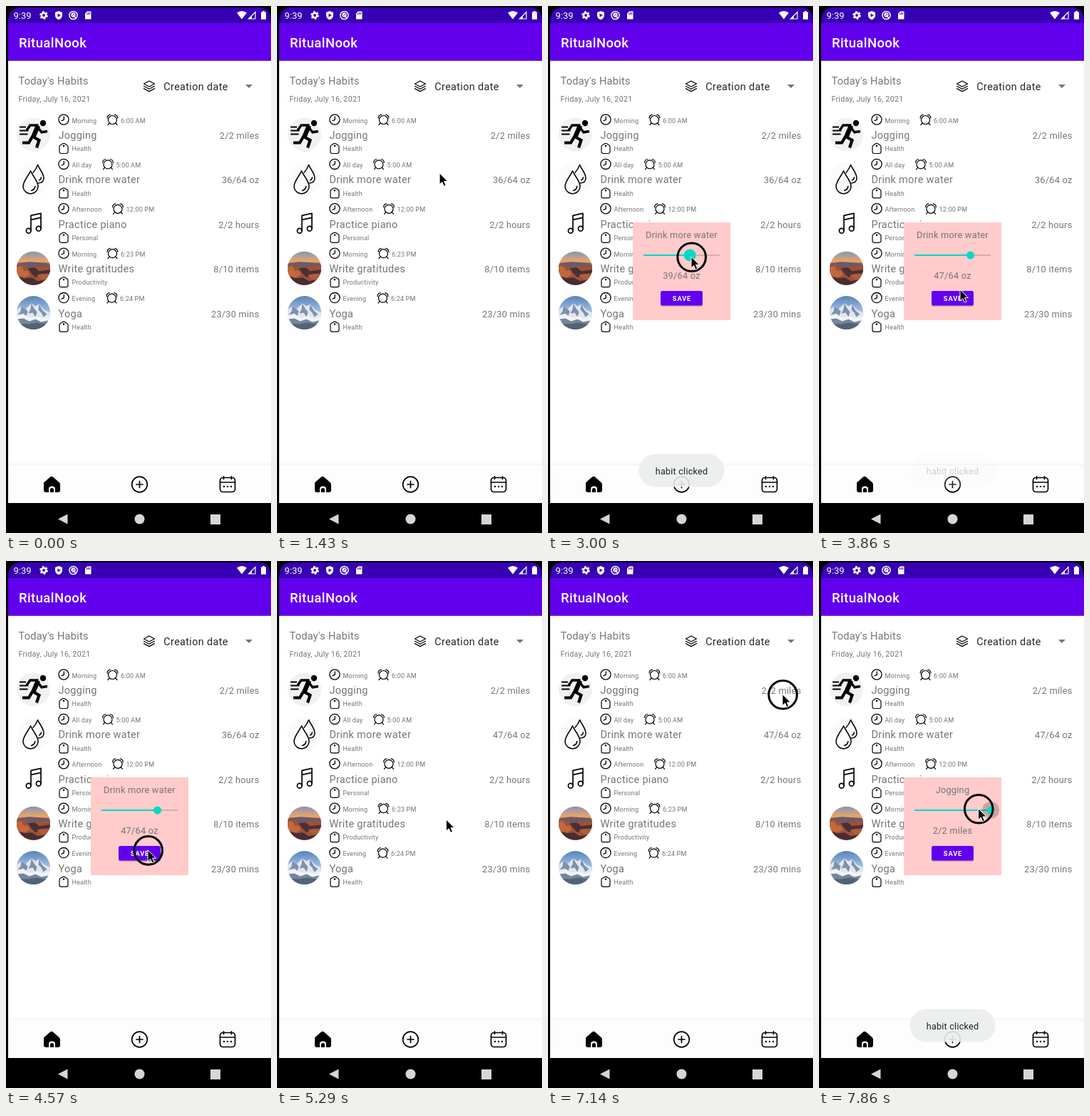
Animation of 372 by 738 pixels, one loop 8 s. Source, as an HTML page:

```html
<!DOCTYPE html>
<html lang="en">
<head>
<meta charset="utf-8">
<title>Habit list</title>
<style>
  html, body { margin: 0; width: 100%; height: 100%; overflow: hidden; background: #000; }
  svg { display: block; width: 372px; height: 738px; }
  text { font-family: Roboto, sans-serif; letter-spacing: .0178em; fill: #757575; }
  .big { font-size: 14.55px; }
  .mid { font-size: 12.8px; }
  .date { font-size: 10.8px; }
  .small { font-size: 9.1px; }
  .end { text-anchor: end; }
  .center { text-anchor: middle; }
  .line { fill: none; stroke: #000; stroke-linecap: round; stroke-linejoin: round; }
</style>
</head>
<body>
<svg viewBox="0 0 372 738">
  <defs>
    <clipPath id="disc"><circle r="23.5"/></clipPath>
    <linearGradient id="dusk" x2="0" y2="1">
      <stop stop-color="#8592ad"/><stop offset=".15" stop-color="#b59d98"/>
      <stop offset=".3" stop-color="#eaa562"/><stop offset=".38" stop-color="#c98257"/>
    </linearGradient>
    <linearGradient id="sky" x2="0" y2="1">
      <stop stop-color="#5583bd"/><stop offset=".5" stop-color="#a9c4e2"/>
    </linearGradient>
    <pattern id="checks" width="4" height="4" patternUnits="userSpaceOnUse">
      <path fill="#f6f6f6" d="M0 0h2v2H0zM2 2h2v2H2z"/>
    </pattern>
    <linearGradient id="edge" x2="0" y2="1">
      <stop stop-color="#fff"/><stop offset="1" stop-color="#f3f3f3"/>
    </linearGradient>

    <g id="clock" class="line" stroke-width="1.3">
      <circle r="7.1"/><path d="M.3-4V.3L-3 1.6"/>
    </g>
    <g id="alarm" class="line" stroke-width="1.2">
      <circle r="6"/><path d="M-7.3-2.5Q-7.5-6.5-3.2-7.4M3.2-7.4Q7.5-6.5 7.3-2.5M-4.3 4.3-6.5 7M4.3 4.3 6.5 7"/>
    </g>
    <g id="tag" class="line" stroke-width="1.2">
      <path d="M-6-2.5Q-6-4-4.5-4.8L-1.5-6.7Q0-7.4 1.5-6.7L4.5-4.8Q6-4 6-2.5V4.5Q6 7 3.5 7H-3.5Q-6 7-6 4.5Z"/>
      <circle cy="-3.6" r=".7"/>
    </g>

    <g id="runner">
      <circle r="23.5" fill="#f1f1f1"/>
      <circle cx="13.5" cy="-16" r="4.2"/>
      <g class="line" stroke-width="3.4" style="stroke-linecap:butt;stroke-linejoin:miter">
        <path d="M6.500-12.500-.5 4" stroke-width="6.500"/>
        <path d="M7-13H-4.500L-9.500-6M6.500-9.500 11.500-3.200 19.500-4.500"/>
        <path d="M-2.500 2 8 8 4.500 18.500M-1.500 3-6.500 11.500H-15.500" stroke-width="4.200"/>
        <path d="M-19.500-10.500H-10.500M-19.500-5.500H-7M-19.500-.5H-8" stroke-width="1.800"/>
      </g>
    </g>
    <g id="drops">
      <circle r="23.5" fill="url(#checks)"/>
      <g class="line" stroke-width="1.5">
        <path d="M-4-11.500C-7-4.500-14.500 3-14.500 10A10.500 10.500 0 0 0 6.500 10C6.500 3-1-4.500-4-11.500Z"/>
        <path d="M-.5-9Q4-14.500 6-20C9-13 14.500-8 14.500-1.500Q14.500 5 7 5.500M-3 16Q1.800 15 2.300 10M8 1.500Q10.500 1 11-2.500"/>
      </g>
    </g>
    <g id="notes" class="line" stroke-width="1.7">
      <path d="M-3.500 9.500V-11.500L10.500-14.500V6.500M-3.500-5.500 10.500-8.500"/>
      <ellipse cx="-6.800" cy="10" rx="3.300" ry="3.400"/><ellipse cx="7.200" cy="7" rx="3.300" ry="3.400"/>
    </g>
    <g id="canyon" clip-path="url(#disc)">
      <path fill="url(#dusk)" d="M-24-24h48v48h-48z"/>
      <path fill="#6a5a68" d="M-24-7-6-9 24-7V8H-24Z"/>
      <path fill="#9c5138" d="M-24-4-14-5-8 0 4-2 24-4V24H-24Z"/>
      <path fill="#c3683c" d="M-24-2-17-3-13 4-8 3-5 9-12 13-24 10Z"/>
      <path fill="#4a2f33" d="M-8 0 2-1 8 4 24 2V7L11 8 3 13-3 7Z"/>
      <path fill="#b35c39" d="M5 9 14 8 24 9V15L12 16Z"/>
      <path fill="#472d30" d="M-24 11-12 14-2 13 6 18 24 15V24H-24Z"/>
    </g>
    <g id="summit" clip-path="url(#disc)">
      <path fill="url(#sky)" d="M-24-24h48v48h-48z"/>
      <path fill="#dfe7f0" d="M-24-4-17-9-11-5-3-13 3-9 8-12 15-4 24 0V24H-24Z"/>
      <path fill="#7f90a8" d="M-17-9-18-2-22 3-14 1-10 5-8-2-11-5ZM-3-13-4-5-7 1-1 0 3 6 5-1 1-6ZM8-12 7-4 11 0 14 6 19 2 13-3Z"/>
      <path fill="#f1f4f8" d="M-24 4-12 3-5 7 5 5 13 8 24 5V12L6 14-24 11Z"/>
      <path fill="#75869c" d="M-24 9-14 8-6 12 3 9 11 13 24 10V24H-24Z"/>
      <path fill="#536274" d="M-24 15-8 16 4 14 24 17V24H-24Z"/>
    </g>
  </defs>

  <path fill="#fff" d="M3 76.500H372V696H3Z"/>
  <path fill="#3700b3" d="M3 24V22Q3 2 22 2H354Q372 2 372 22V24Z"/>
  <path fill="#6200ee" d="M3 24H372V76.500H3Z"/>

  <!-- status bar -->
  <text x="10.5" y="18" font-size="13" style="fill:#fff;letter-spacing:0">9:39</text>
  <g fill="#fff">
    <circle cx="53" cy="13" r="3.2" fill="none" stroke="#fff" stroke-width="2.6"/>
    <circle cx="53" cy="13" r="5" fill="none" stroke="#fff" stroke-width="1.8" stroke-dasharray="2.6 2.636"/>
    <path d="M74 7 79 9V13Q79 17.5 74 19.3 69 17.5 69 13V9Z"/>
    <path d="M72.5 10.5V15.5L76.8 13Z" fill="#3700b3"/>
    <g fill="none" stroke="#fff" stroke-width="1.5">
      <circle cx="94.5" cy="13" r="5.6"/><circle cx="94.5" cy="12.5" r="2.4"/><path d="M93 11 98 17"/>
    </g>
    <path d="M114 7.5H119.5V18.5H111V10.5Z"/>
    <path d="M113.5 10V12M115.5 9V12M117.5 9V12" stroke="#3700b3"/>
    <path d="M324 9.5Q331 4.500 338 9.500L331 18.500Z"/>
    <path d="M340.500 18 350 8.500V18Z" fill="none" stroke="#fff" stroke-width="1.2"/>
    <path d="M345 13.500V18H340.500Z"/>
    <path d="M358 8.500H360V7H363V8.500H365V18.800H358Z"/>
  </g>
  <text x="18" y="57.5" font-size="18.5" font-weight="500" style="fill:#fff;letter-spacing:.4px">RitualNook</text>

  <!-- list heading -->
  <text class="big" x="17.5" y="110">Today's Habits</text>
  <text class="date" x="17.5" y="133.5">Friday, July 16, 2021</text>
  <path class="line" stroke-width="1.2" d="M201 105 208.500 109 201 113 193.500 109ZM193.500 112.300 201 116.300 208.500 112.300M193.500 115.600 201 119.600 208.500 115.600"/>
  <text x="221.300" y="117.5" font-size="14.4" style="fill:#262626;letter-spacing:.025em">Creation date</text>
  <path fill="#757575" d="M336 110H346L341 115Z"/>

  <g id="rows"></g>

  <!-- bottom tabs and system keys -->
  <path fill="url(#edge)" d="M3 639H372V643H3Z"/>
  <path fill="#fdfdfd" d="M3 643H372V691H3Z"/>
  <path fill="#fff" d="M3 691H372V696H3Z"/>
  <path d="M53 667.500 62 659.500Q64 658 66 659.500L75 667.500Q76 668.500 76 670V678Q76 681 73 681H69V676Q69 672.500 64.500 672.500T60 676V681H56Q53 681 53 678Z"/>
  <path d="M62 681V677Q62 675 64.500 675T67 677V681Z"/>
  <g class="line" stroke-width="1.7">
    <circle cx="187.5" cy="670" r="10.8"/><path d="M187.500 665.500V674.500M183 670H192"/>
    <rect x="300.5" y="660.5" width="21" height="20" rx="4"/>
    <path d="M300.500 667H321.500M305.500 658.800V662.500M316.500 658.800V662.500"/>
    <path d="M306 673h.1M311 673h.1M316 673h.1" stroke-width="2.3"/>
  </g>
  <g fill="#d6d6d6">
    <path d="M73 718.500 86.500 711.500V725.500Z"/>
    <circle cx="187.5" cy="718.5" r="7"/>
    <path d="M287 712H301V726H287Z"/>
  </g>

  <g id="dialog">
    <rect x="119" y="303" width="137" height="137" fill="#ffcbcb"/>
    <text id="title" class="mid center" x="187.5" y="325"></text>
    <path stroke="#c8a3a3" stroke-width="1.5" d="M134 349H241"/>
    <path id="filled" stroke="#03dac5" stroke-width="2"/>
    <circle id="halo" cy="349" r="12" fill="#000" opacity=".2"/>
    <circle id="thumb" cy="349" fill="#03dac5"/>
    <text id="amount" class="mid center" x="187.5" y="381.5"></text>
    <rect x="158" y="400" width="59" height="21" rx="2.5" fill="#000" opacity=".2"/>
    <rect x="158" y="399" width="59" height="20.5" rx="2.5" fill="#6200ee"/>
    <text class="center" x="188" y="413" font-size="9.3" font-weight="700" style="fill:#fff;letter-spacing:.09em">SAVE</text>
  </g>

  <g id="toast">
    <rect x="127.5" y="627.5" width="120" height="46" rx="23" fill="#ebeeee" opacity=".9"/>
    <text class="center" x="187.5" y="655.5" font-size="12.6" style="fill:#222">habit clicked</text>
  </g>

  <g id="pointer">
    <circle id="ring" cx=".7" cy=".7" r="19.8" fill="none" stroke="#000" stroke-width="3"/>
    <path d="M0 0V16L3.700 12.600 6.200 18.300 9 17.100 6.500 11.500H11.500Z" stroke="#fff" stroke-width="1"/>
  </g>
</svg>
<script>
const $ = id => document.getElementById(id);

const habits = [
  ['runner', 'Morning', '6:00 AM', 161, 'Jogging', 'Health', '2/2 miles'],
  ['drops', 'All day', '5:00 AM', 154.5, 'Drink more water', 'Health', '36/64 oz'],
  ['notes', 'Afternoon', '12:00 PM', 168.5, 'Practice piano', 'Personal', '2/2 hours'],
  ['canyon', 'Morning', '6:23 PM', 161, 'Write gratitudes', 'Productivity', '8/10 items'],
  ['summit', 'Evening', '6:24 PM', 160, 'Yoga', 'Health', '23/30 mins']
];
$('rows').innerHTML = habits.map(([icon, part, time, x, name, label, done], i) => `
  <g transform="translate(0 ${62.4 * i})">
    <use href="#${icon}" x="38.5" y="180"/>
    <use href="#clock" x="81" y="159"/>
    <text class="small" x="92.5" y="163.7">${part}</text>
    <use href="#alarm" x="${x - 11.5}" y="159.5"/>
    <text class="small" x="${x}" y="163.7">${time}</text>
    <text class="big" x="73.5" y="186">${name}</text>
    <use href="#tag" x="81" y="199.5"/>
    <text class="small" x="92.5" y="203.3">${label}</text>
    <text class="mid end" id="done${i}" x="355.5" y="186">${done}</text>
  </g>`).join('');

const LOOP = 8000, STEP = 1000 / 7;

// pointer path: time, x, y
const path = [
  [1000, 380, 214], [1143, 318, 223], [1286, 262, 230], [1429, 228, 234],
  [1857, 228, 236], [2143, 208, 315], [2286, 195, 350], [2429, 195, 350],
  [3000, 201, 351], [3286, 210, 351], [3429, 218, 351], [3571, 213.5, 351],
  [3857, 198, 397], [4286, 199, 404], [4714, 199, 405], [5000, 216, 388],
  [5286, 237.5, 362], [5714, 316, 270], [6000, 346, 246], [6571, 312, 252.5],
  [7000, 329, 188], [7286, 329, 185], [7571, 290, 250], [7857, 223.5, 346.5]
];
const presses = [[1560, 1800], [2280, 3600], [4420, 4600], [6990, 7200], [7840, LOOP]];

const within = (t, a, b) => t >= a && t < b;
const show = (id, opacity) => $(id).setAttribute('opacity', +opacity);

function pointerAt(t) {
  const i = path.findIndex(p => p[0] > t);
  if (i === 0) return path[0].slice(1);
  if (i < 0) return path[path.length - 1].slice(1);
  const [a, b] = [path[i - 1], path[i]];
  const k = (t - a[0]) / (b[0] - a[0]);
  return [a[1] + (b[1] - a[1]) * k, a[2] + (b[2] - a[2]) * k];
}

function ounces(t) {
  if (t < 2400) return 36;
  const x = pointerAt(Math.min(t, 3571))[0];
  return Math.max(36, Math.floor((x - 134.5) / 107 * 64));
}

function draw(t) {
  const [x, y] = pointerAt(t);
  $('pointer').setAttribute('transform', `translate(${x} ${y})`);
  show('pointer', t > 990);
  show('ring', presses.some(p => within(t, ...p)));

  const jogging = t > 7000;
  const water = ounces(t);
  const thumbX = 134 + 107 * (jogging ? 1 : water / 64);
  show('dialog', within(t, 1850, 4700) || t > 7420);
  $('title').textContent = habits[jogging ? 0 : 1][4];
  $('amount').textContent = jogging ? '2/2 miles' : `${water}/64 oz`;
  $('filled').setAttribute('d', `M134 349H${thumbX}`);
  $('thumb').setAttribute('cx', thumbX);
  $('thumb').setAttribute('r', within(t, 2400, 3600) ? 8.5 : 5.5);
  $('halo').setAttribute('cx', thumbX);
  show('halo', t > 7840 || within(t, 2280, 2400) ? .2 : 0);
  $('done1').textContent = `${t < 4700 ? 36 : 47}/64 oz`;

  show('toast', within(t, 1850, 3700) || t > 7420 ? 1 : within(t, 3700, 3900) ? .2 : 0);
}

function tick(now) {
  const t = now % LOOP;
  draw(Math.floor((t + 4) / STEP) * STEP);
  requestAnimationFrame(tick);
}
draw(0);
requestAnimationFrame(tick);
</script>
</body>
</html>
```
